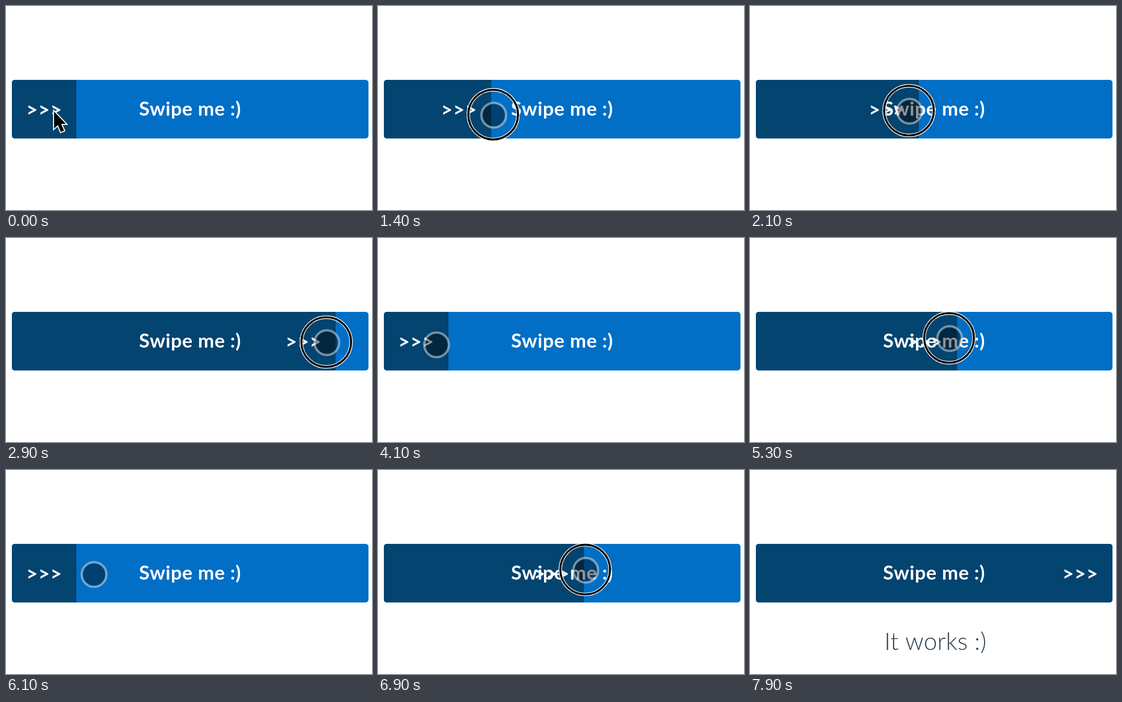
Animation of 624x348 px, one loop 8000 ms. Source, as an HTML page with a canvas:

```html
<!DOCTYPE html>
<html lang="en">
<head>
<meta charset="utf-8">
<title>Swipe button</title>
<style>
  html, body { margin: 0; width: 100%; height: 100%; overflow: hidden; background: #fff; }
  canvas { display: block; width: 624px; height: 348px; }
</style>
</head>
<body>
<canvas id="stage" width="624" height="348"></canvas>
<script>
const ctx = document.getElementById('stage').getContext('2d');
const LOOP = 8000, STEP = 100;
const BAR = { x: 10, y: 126, w: 608, h: 100, r: 5 };
const REST = 120, END = 618, GRIP = 16, LAG = 20, SPRING = 250;
const BLUE = '#006fc5', DARK = '#034470', INK = '#2c3e50';

const smooth = u => u * u * (3 - 2 * u);
const easeIn = p => u => u ** p;
const easeOut = p => u => 1 - (1 - u) ** p;

// The hand pauses between moves; each one starts where the last ended
const moves = [];
let hand = { x: 82, y: 182 };
function move(start, end, x, y, ease = smooth) {
  moves.push({ start, end, from: hand, to: { x, y }, ease });
  hand = { x, y };
}

// First swipe: out, back, nearly to the end, then home
move(0, 300, 67, 182.5);
move(800, 1600, 567, 185, easeIn(4.7));
move(1600, 2100, 271, 178);
move(2100, 2900, 546, 177, easeOut(2));
move(3500, 4300, 88, 181, easeOut(2.7));
// Second swipe: given up halfway
move(4400, 4900, 567, 174);
move(4900, 5150, 328, 170);
move(5150, 5600, 372, 170);
move(5850, 6200, 94, 177.5);
// Third swipe: all the way
move(6400, 7100, 569, 168.5, easeIn(1.8));
move(7100, 7400, 326, 170);
move(7400, 7600, 602, 172);
move(7800, 7900, 680, 172);

const drags = [
  { press: 600, up: 3050 },
  { press: 4300, up: 5350 },
  { press: 6400, up: 7750, done: true }
];

function pointer(t) {
  const m = moves.filter(n => t >= n.start).pop();
  const u = Math.min(1, (t - m.start) / (m.end - m.start));
  return {
    x: m.from.x + (m.to.x - m.from.x) * m.ease(u),
    y: m.from.y + (m.to.y - m.from.y) * Math.sin(u * Math.PI / 2)
  };
}

const follow = t => Math.min(END, Math.max(REST, pointer(t - LAG).x + GRIP));

function edgeAt(t) {
  const d = drags.filter(g => t >= g.press).pop();
  if (!d) return REST;
  if (t < d.up) return follow(t);
  if (d.done) return END;
  const u = Math.min(1, (t - d.up) / SPRING);
  return follow(d.up) + (REST - follow(d.up)) * easeOut(2)(u);
}

function text(str, x, y, font, color, spacing) {
  ctx.font = font + ' Lato, "Open Sans", sans-serif';
  ctx.letterSpacing = spacing + 'px';
  ctx.fillStyle = color;
  ctx.fillText(str, x, y);
}

function circle(x, y, r, width, color) {
  ctx.beginPath();
  ctx.arc(x, y, r, 0, Math.PI * 2);
  ctx.lineWidth = width;
  ctx.strokeStyle = color;
  ctx.stroke();
}

function drawBar(edge) {
  ctx.save();
  ctx.beginPath();
  ctx.roundRect(BAR.x, BAR.y, BAR.w, BAR.h, BAR.r);
  ctx.clip();
  ctx.fillStyle = BLUE;
  ctx.fillRect(BAR.x, BAR.y, BAR.w, BAR.h);
  ctx.fillStyle = DARK;
  ctx.fillRect(BAR.x, BAR.y, edge - BAR.x, BAR.h);
  ctx.restore();
  text('Swipe me :)', 226.7, 187, 'bold 33px', '#fff', 0.6);
  text('>>>', edge - 85.5, 189, 'bold 34px', '#fff', 0.8);
}

function drawArrow(x, y) {
  ctx.beginPath();
  [[0, 0], [0, 29], [6.5, 23], [11.5, 35], [17, 32.6], [12, 21], [20, 21]]
    .forEach(([dx, dy]) => ctx.lineTo(x + dx, y + dy));
  ctx.closePath();
  ctx.lineWidth = 3.5;
  ctx.strokeStyle = '#fff';
  ctx.stroke();
  ctx.fillStyle = '#000';
  ctx.fill();
}

function drawTouch(x, y) {
  ctx.beginPath();
  ctx.arc(x, y, 20, 0, Math.PI * 2);
  ctx.fillStyle = 'rgba(0,0,0,.42)';
  ctx.fill();
  circle(x, y, 21, 4, 'rgba(225,225,225,.5)');
}

function drawRing(x, y) {
  circle(x, y, 42.4, 5.6, '#fff');
  circle(x, y, 42.4, 3.4, '#000');
}

function draw(t) {
  ctx.fillStyle = '#fff';
  ctx.fillRect(0, 0, 624, 348);
  drawBar(Math.round(edgeAt(t)));
  if (t >= drags[2].up) text('It works :)', 229, 307, '300 41px', INK, 0.2);
  const { x, y } = pointer(t);
  if (t < STEP) drawArrow(82, 180);
  else drawTouch(x + 1, y + 1.5);
  if (drags.some(d => t >= d.press && t < d.up)) drawRing(x, y + 0.5);
}

function tick() {
  draw(Math.floor(performance.now() % LOOP / STEP) * STEP);
  requestAnimationFrame(tick);
}
tick();
</script>
</body>
</html>
```
